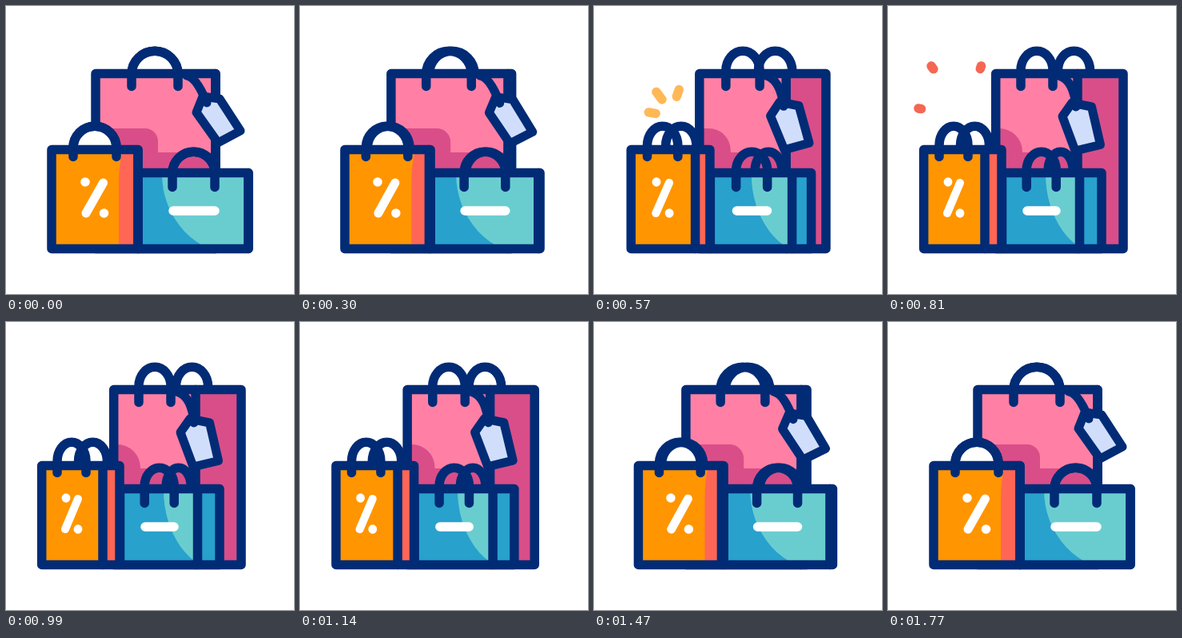
An HTML page for the animation above (1800 ms loop, 360 by 360 pixels).

```html
<!DOCTYPE html>
<html lang="en">
<head>
<meta charset="utf-8">
<title>Shopping bags</title>
<style>
html, body { margin: 0; width: 100%; height: 100%; overflow: hidden; background: #fff; }
svg { display: block; width: 100vw; height: 100vh; }
</style>
</head>
<body>
<svg id="stage" viewBox="0 0 360 360"></svg>
<script>
const LOOP = 1800;
const NAVY = '#022b76', PINK = '#ff80a4', MAGENTA = '#d94e88', ORANGE = '#ff9500',
  CORAL = '#ff6655', TEAL = '#69cdd0', BLUE = '#28a1cd', TAG = '#d1defb';
const BOTTOM = 303.5;
const STROKE = 11.5;
const stage = document.getElementById('stage');

const clamp = v => Math.min(1, Math.max(0, v));
const span = (t, from, to) => clamp((t - from) / (to - from));
const ease = u => u < 0.5 ? 4 * u ** 3 : 1 - 4 * (1 - u) ** 3;
const lerp = (a, b, u) => a + (b - a) * u;

const path = (d, fill, stroke = 'none', width = STROKE) =>
  `<path d="${d}" fill="${fill}" stroke="${stroke}" stroke-width="${width}" stroke-linecap="round" stroke-linejoin="round"/>`;
const line = (x1, y1, x2, y2, color = NAVY, width = STROKE) =>
  path(`M${x1} ${y1}L${x2} ${y2}`, 'none', color, width);
const rect = (x1, y1, x2, y2, fill, stroke) =>
  path(`M${x1} ${y1}H${x2}V${y2}H${x1}Z`, fill, stroke);
const dot = (x, y, rx, ry, fill) =>
  `<ellipse cx="${x}" cy="${y}" rx="${rx}" ry="${ry}" fill="${fill}"/>`;

function handle(x, half, top, height, end, fill = 'none', stroke = NAVY) {
  const shoulder = top + height;
  return path(`M${x - half} ${end}V${shoulder}A${half} ${height} 0 0 1 ${x + half} ${shoulder}V${end}`, fill, stroke);
}

// A bag has a front (left..mid) and a gusset (mid..right) that unfolds.
function bag({ left, mid, right, top, front, side, art, grip }) {
  const { x, half, backHalf = half, gap, y, height, end } = grip;
  return handle(x + gap, backHalf, y, height, top) +
    rect(mid, top, right, BOTTOM, side) +
    rect(left, top, mid, BOTTOM, front) + art +
    rect(left, top, right, BOTTOM, 'none', NAVY) +
    line(mid, top, mid, BOTTOM) +
    handle(x, half, y, height, end);
}

function pinkBag(mix) {
  const left = mix(112, 134.7), mid = mix(262, 237), edge = mix(190, 168), curve = mix(16, 29);
  const shade = `M${left} 153H${edge - curve}A${curve} ${curve} 0 0 1 ${edge} ${153 + curve}V183H${mid}V${BOTTOM}H${left}Z`;
  return bag({
    left, mid, right: mix(262, 294), top: 84.5, front: PINK, side: MAGENTA,
    art: path(shade, MAGENTA),
    grip: { x: 186, half: mix(29, 20), gap: mix(0, 46.5), y: 56.3, height: mix(29, 24), end: 100.5 }
  });
}

function tag(mix) {
  const corners = [[238, 218, 133, 138], [246, 230, 113, 121], [267, 254.5, 116, 126],
    [293, 265.5, 156, 173.5], [265, 234, 171, 181]];
  const outline = corners.map(([x0, x1, y0, y1]) => `${mix(x0, x1)} ${mix(y0, y1)}`).join('L');
  const x = mix(251, 235), y = mix(121, 126), start = mix(226, 213);
  return path(`M${outline}Z`, TAG, NAVY, 11) +
    path(`M${start} 87Q${mix(238, 232)} ${mix(89, 92)} ${x} ${y}`, 'none', NAVY, 11);
}

function tealBag(mix) {
  const left = mix(165, 142.5), mid = mix(303, 239.5), top = 208.5;
  const glow = `<clipPath id="front"><path d="M${left} ${top}H${mid}V${BOTTOM}H${left}Z"/></clipPath>
    <g clip-path="url(#front)">${dot(mix(290, 271), 210, mix(95, 74), 101, TEAL)}
    ${path(`M${mix(290, 271)} ${top}H303V${BOTTOM}H${mix(290, 271)}Z`, TEAL)}</g>`;
  return bag({
    left, mid, right: mix(303, 267), top, front: BLUE, side: BLUE,
    art: glow,
    grip: {
      x: mix(234.5, 191.7), half: mix(26.5, 18.5), backHalf: mix(26.5, 15.5),
      gap: mix(0, 24), y: 182.2, height: mix(26.5, 23), end: 226.5
    }
  }) + line(mix(209, 174), 256, mix(261, 210), 256, '#fff');
}

function orangeBag(mix) {
  const left = mix(57, 44.7), mid = mix(165, 121), top = 179.5, fold = mid - mix(24, 0);
  const grip = { x: mix(111, 82), half: mix(27, 18), gap: mix(0, 26.5), y: 150.2, height: mix(27, 24), end: 188.5 };
  const strip = `M${fold + mix(5, 0)} ${top}Q${fold} 200 ${fold} 218V${BOTTOM}H${mid}V${top}Z`;
  const rx = mix(5.8, 5.4);
  return handle(grip.x, grip.half, grip.y, grip.height, top, '#fff', 'none') +
    bag({
      left, mid, right: mix(165, 142), top, front: ORANGE, side: CORAL,
      art: path(strip, CORAL), grip
    }) +
    line(mix(121.5, 90), 221, mix(100, 74), 259, '#fff', mix(11, 10)) +
    dot(mix(99, 75), 220, rx, 5.8, '#fff') + dot(mix(122.5, 90), 259, rx, 5.8, '#fff');
}

function sparks(t) {
  if (t < 500 || t > 840) return '';
  const head = span(t, 500, 740), tail = span(t, 545, 835);
  const heat = span(t, 600, 800);
  const color = `rgb(${lerp(255, 245, heat)},${lerp(184, 103, heat)},${lerp(86, 82, heat)})`;
  return [[88, 121, 54, 75], [102, 117, 116.5, 75], [81, 135, 38, 128]].map(([x1, y1, x2, y2]) =>
    line(lerp(x1, x2, tail), lerp(y1, y2, tail), lerp(x1, x2, head), lerp(y1, y2, head), color)
  ).join('');
}

function draw(t) {
  const open = ease(span(t, 120, 780)) - ease(span(t, 1020, 1680));
  const mix = (closed, opened) => lerp(closed, opened, open);
  stage.innerHTML = sparks(t) + pinkBag(mix) + tag(mix) + tealBag(mix) + orangeBag(mix);
}

const began = performance.now();
function tick() {
  draw((performance.now() - began) % LOOP);
  requestAnimationFrame(tick);
}
draw(0);
requestAnimationFrame(tick);
</script>
</body>
</html>
```
